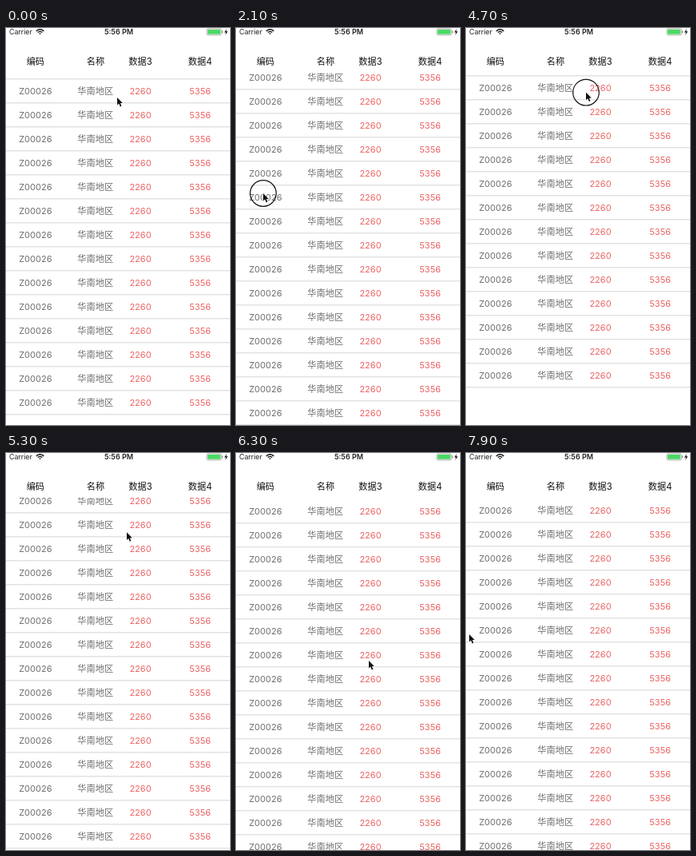
Animation, 280 px wide and 497 px high, one loop 8000 ms. Source, as an HTML page with a canvas:

```html
<!DOCTYPE html>
<html lang="zh-CN">
<head>
<meta charset="utf-8">
<style>
html, body { margin: 0; width: 280px; height: 497px; overflow: hidden; background: #fff; }
canvas { display: block; }
</style>
</head>
<body>
<canvas id="stage" width="280" height="497"></canvas>
<script>
const W = 280, H = 497, LOOP = 8000, STEP = 100, TOUCH = 400;
const COL = 224 / 3, ROW = 30, ROWS = 15, TOP = 57;
const MAX_X = 168, MAX_Y = 10;
const FONT = 'Inter, "Noto Sans CJK SC", "Noto Sans CJK", sans-serif';
const values = ['2068', '1046', '2260', '5356'];
const c = document.getElementById('stage').getContext('2d');

// Finger swipes: start time, start point, end point
const swipes = [
  [700, 206, 250, 305, 255],
  [1700, 240, 213, 34, 207],
  [2500, 170, 215, 300, 223],
  [3500, 271, 223, 77, 223],
  [4400, 150, 225, 150, 54],
  [5400, 151, 103, 166, 260],
  [6500, 166, 260, 300, 240],
  [7300, 230, 233, 26, 228],
];
const stops = [
  [0, 139, 87],
  ...swipes.flatMap(([t, x0, y0, x1, y1]) => [[t, x0, y0], [t + TOUCH, x1, y1]]),
  [7900, 4, 227],
];

const clamp = u => Math.min(1, Math.max(0, u));
const ease = u => (u = clamp(u)) * u * (3 - 2 * u);
const bounce = t => t < TOUCH ? ease(t / TOUCH) : (1 - clamp((t - TOUCH) / 600)) ** 2;

function scrollX(t) {
  return swipes
    .filter(([, x0, y0, x1, y1]) => Math.abs(x1 - x0) > Math.abs(y1 - y0))
    .reduce((x, [start, x0, , x1]) =>
      x + (x1 > x0 ? -MAX_X * ease((t - start) / 600) : MAX_X * ease((t - start) / 400)), MAX_X);
}

function scrollY(t) {
  const rest = MAX_Y * (1 - ease((t - 5400) / TOUCH));
  return Math.round(rest + 56 * (bounce(t + 710) + bounce(t - 4400)) - 50 * bounce(t - 5400));
}

function pointer(t) {
  const i = stops.findIndex(s => s[0] > t);
  if (i < 0) return stops[stops.length - 1].slice(1);
  const [t0, x0, y0] = stops[i - 1], [t1, x1, y1] = stops[i];
  const e = ease((t - t0) / (t1 - t0));
  return [x0 + (x1 - x0) * e, y0 + (y1 - y0) * e];
}

function text(s, x, y, color, size = 11.2, weight = 400, align = 'center') {
  c.font = `${weight} ${size}px ${FONT}`;
  c.textAlign = align;
  c.fillStyle = color;
  c.fillText(s, x, y);
}

function clipped(x, y, w, h, draw) {
  c.save();
  c.beginPath();
  c.rect(x, y, w, h);
  c.clip();
  draw();
  c.restore();
}

function polygon(points) {
  c.beginPath();
  points.forEach(p => c.lineTo(...p));
  c.closePath();
}

function statusBar() {
  text('Carrier', 4, 8, '#222', 8.8, 400, 'left');
  text('5:56 PM', 141, 8, '#222', 9, 600);
  c.fillStyle = c.strokeStyle = '#111';
  c.lineWidth = 1.5;
  [.9, 3.6, 6.2].forEach(r => {
    c.beginPath();
    c.arc(42.5, 8, r, -Math.PI * .77, -Math.PI * .23);
    c.stroke();
  });

  c.strokeStyle = '#999';
  c.lineWidth = .8;
  c.beginPath();
  c.roundRect(250.9, .9, 18.4, 8, 2);
  c.stroke();
  c.fillStyle = '#4cd964';
  c.beginPath();
  c.roundRect(252, 2, 16.2, 5.8, 1);
  c.fill();
  c.fillStyle = '#999';
  c.fillRect(270, 3.4, 1, 3);
  c.fillStyle = '#111';
  polygon([[275.8, 1], [273, 5.4], [275, 5.4], [274.2, 9], [277.2, 4.3], [275.2, 4.3]]);
  c.fill();
}

function table(sx, sy) {
  const dataX = n => COL * (2.5 + n) - sx;
  text('编码', COL / 2 - .5, 46, '#111');
  text('名称', COL * 1.5, 46, '#111');
  clipped(COL * 2, 20, W, 36, () =>
    values.forEach((v, n) => text('数据' + (n + 1), dataX(n), 46, '#111')));

  clipped(0, 56, W, H, () => {
    for (let i = 0; i < ROWS; i++) {
      const y = TOP + i * ROW - sy, base = y + 19;
      text('Z00026', COL / 2 - .5, base, '#6e6e6e', 11);
      text('华南地区', COL * 1.5 - .3, base, '#6e6e6e');
      c.fillStyle = '#d0d0d0';
      c.fillRect(0, y + ROW - .6, W, .9);
      clipped(COL * 2, 0, W, H, () =>
        values.forEach((v, n) => text(v, dataX(n), base, '#ea6463', 11)));
    }
  });
}

function cursor(x, y, down) {
  if (down) {
    c.strokeStyle = '#111';
    c.lineWidth = 1.2;
    c.beginPath();
    c.arc(x, y, 16.3, 0, 7);
    c.stroke();
  }
  c.save();
  c.translate(x, y);
  polygon([[0, 0], [0, 9.6], [2.2, 7.6], [3.8, 11.4], [5.4, 10.7], [3.9, 7.1], [6.8, 6.9]]);
  c.strokeStyle = '#fff';
  c.lineWidth = 1.4;
  c.stroke();
  c.fillStyle = '#111';
  c.fill();
  c.restore();
}

function frame(now) {
  const t = Math.floor(now % LOOP / STEP) * STEP;
  c.fillStyle = '#fff';
  c.fillRect(0, 0, W, H);
  table(scrollX(t), scrollY(t));
  statusBar();
  cursor(...pointer(t), swipes.some(([start]) => t > start && t <= start + TOUCH));
}

let start;
function tick(now) {
  start ??= now;
  frame(now - start);
  requestAnimationFrame(tick);
}
requestAnimationFrame(tick);
</script>
</body>
</html>
```
